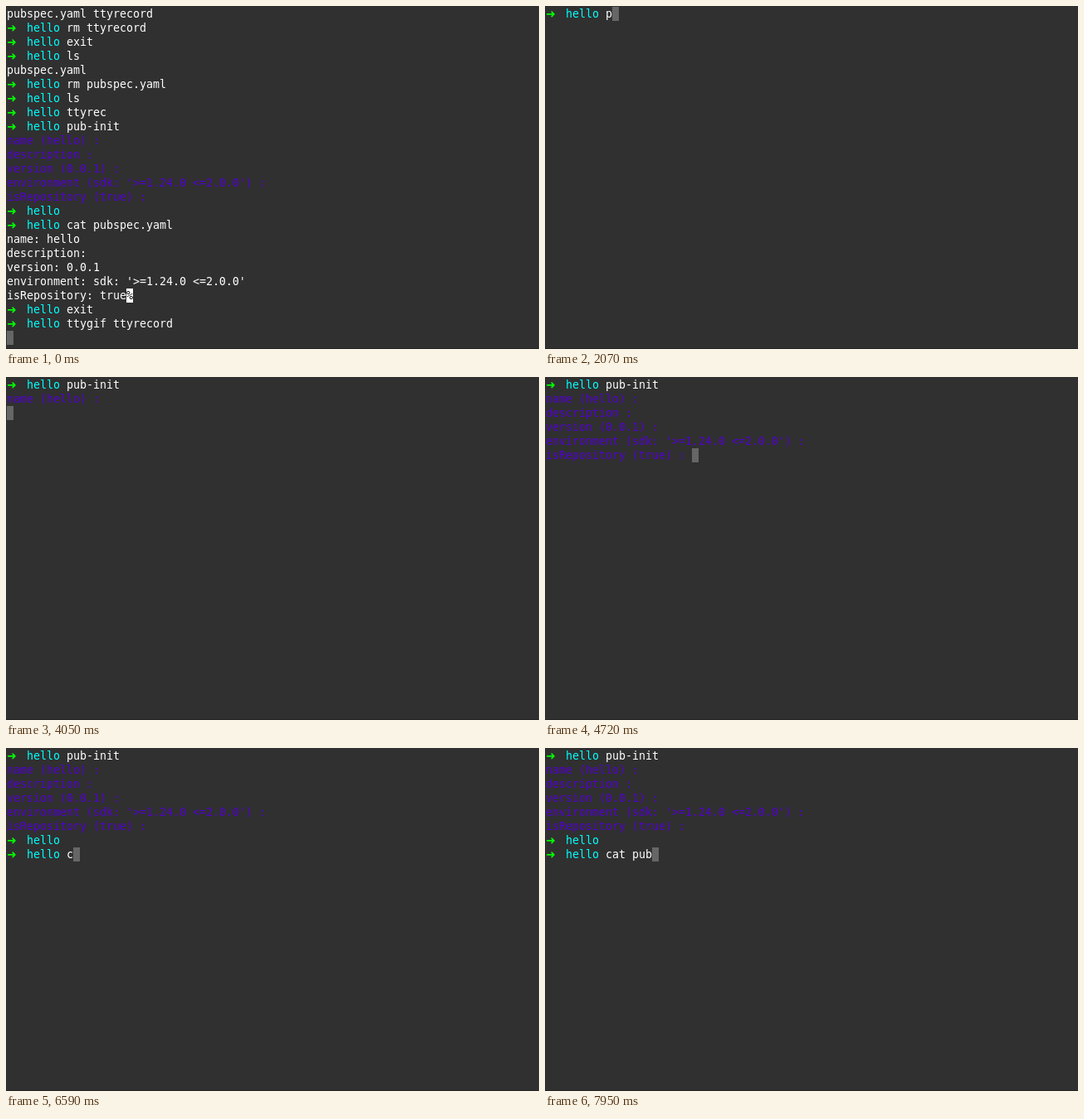
An HTML page that plays this animation: 642 by 414 pixels, repeating every 8000 ms.

```html
<!DOCTYPE html>
<html lang="en">
<head>
<meta charset="utf-8">
<title>pub-init terminal</title>
<style>
  html, body { margin: 0; width: 100%; height: 100%; overflow: hidden; background: #303030; }
  #term { position: relative; width: 642px; height: 414px; overflow: hidden; background: #303030; }
  #edge { position: absolute; left: 0; bottom: 0; width: 642px; height: 1px; background: #252525; }
  #cursor { position: absolute; width: 8px; height: 17px; background: #666; }
  .row {
    position: absolute; left: 1px; height: 17px; white-space: pre; color: #fff;
    font: 13.29px/17px "DejaVu Sans Mono", monospace;
    font-variant-ligatures: none;
  }
  .arrow {
    display: inline-block; width: 8px; height: 17px; vertical-align: top; color: #0f0;
    font: bold 14px/17px "DejaVu Sans", sans-serif;
  }
  .dir { color: #0ff; }
  .ask { color: #5200cc; }
  .mark { display: inline-block; height: 17px; vertical-align: top; background: #fff; color: #000; }
</style>
</head>
<body>
<div id="term"><div id="cursor"></div><div id="rows"></div><div id="edge"></div></div>
<script>
const LOOP = 8000, CELL_W = 8, CELL_H = 17, PAD = 1;
const PROMPT_COLS = 9;

const questions = [
  "name (hello) :",
  "description :",
  "version (0.0.1) :",
  "environment (sdk: '>=1.24.0 <=2.0.0') :",
  "isRepository (true) : "
];

// "$" at the start of a line stands for the shell prompt.
const history = [
  "pubspec.yaml ttyrecord",
  "$rm ttyrecord", "$exit", "$ls",
  "pubspec.yaml",
  "$rm pubspec.yaml", "$ls", "$ttyrec", "$pub-init",
  ...questions,
  "$", "$cat pubspec.yaml",
  "name: hello", "description:", "version: 0.0.1",
  "environment: sdk: '>=1.24.0 <=2.0.0'",
  "isRepository: true%",
  "$exit", "$ttygif ttyrecord", ""
].join("\n");

// Terminal output by time; "\f" clears the screen.
const output = [
  [0, history], [140, "\f"], [200, "$"],
  [2070, "p"], [2230, "u"], [2460, "b"], [2650, "-"],
  [2820, "i"], [2940, "n"], [3070, "i"], [3380, "t"], [3480, "\n"],
  [4050, questions[0] + "\n"], [4210, questions[1] + "\n"],
  [4370, questions[2] + "\n"], [4540, questions[3] + "\n"],
  [4720, questions[4]], [4820, "\n"], [4940, "$"],
  [5120, "\n"], [5240, "$"],
  [6590, "c"], [6710, "a"], [6870, "t"], [7080, " "],
  [7310, "p"], [7780, "u"], [7950, "b"]
];

const rows = document.getElementById("rows");
const cursor = document.getElementById("cursor");

function span(cls, text) {
  const el = document.createElement("span");
  el.className = cls;
  el.textContent = text;
  return el;
}

function makeRow(line, i) {
  const row = document.createElement("div");
  row.className = "row";
  row.style.top = PAD + i * CELL_H + "px";
  if (line[0] === "$") {
    row.append(span("arrow", "➜"), "  ", span("dir", "hello"), " " + line.slice(1));
  } else if (/ : ?$/.test(line)) {
    row.append(span("ask", line));
  } else if (line.endsWith("%")) {
    row.append(line.slice(0, -1), span("mark", "%"));
  } else {
    row.append(line);
  }
  return row;
}

function draw(step) {
  const text = output.slice(0, step + 1).map(entry => entry[1]).join("");
  const lines = text.split("\f").pop().split("\n");
  const last = lines[lines.length - 1];
  const col = last[0] === "$" ? PROMPT_COLS + last.length - 1 : last.length;
  rows.replaceChildren(...lines.map(makeRow));
  cursor.style.left = PAD + col * CELL_W + "px";
  cursor.style.top = PAD + (lines.length - 1) * CELL_H + "px";
}

let shown = -1;
function tick() {
  const t = performance.now() % LOOP;
  const step = output.filter(entry => entry[0] <= t).length - 1;
  if (step !== shown) draw(shown = step);
  requestAnimationFrame(tick);
}
tick();
</script>
</body>
</html>
```
